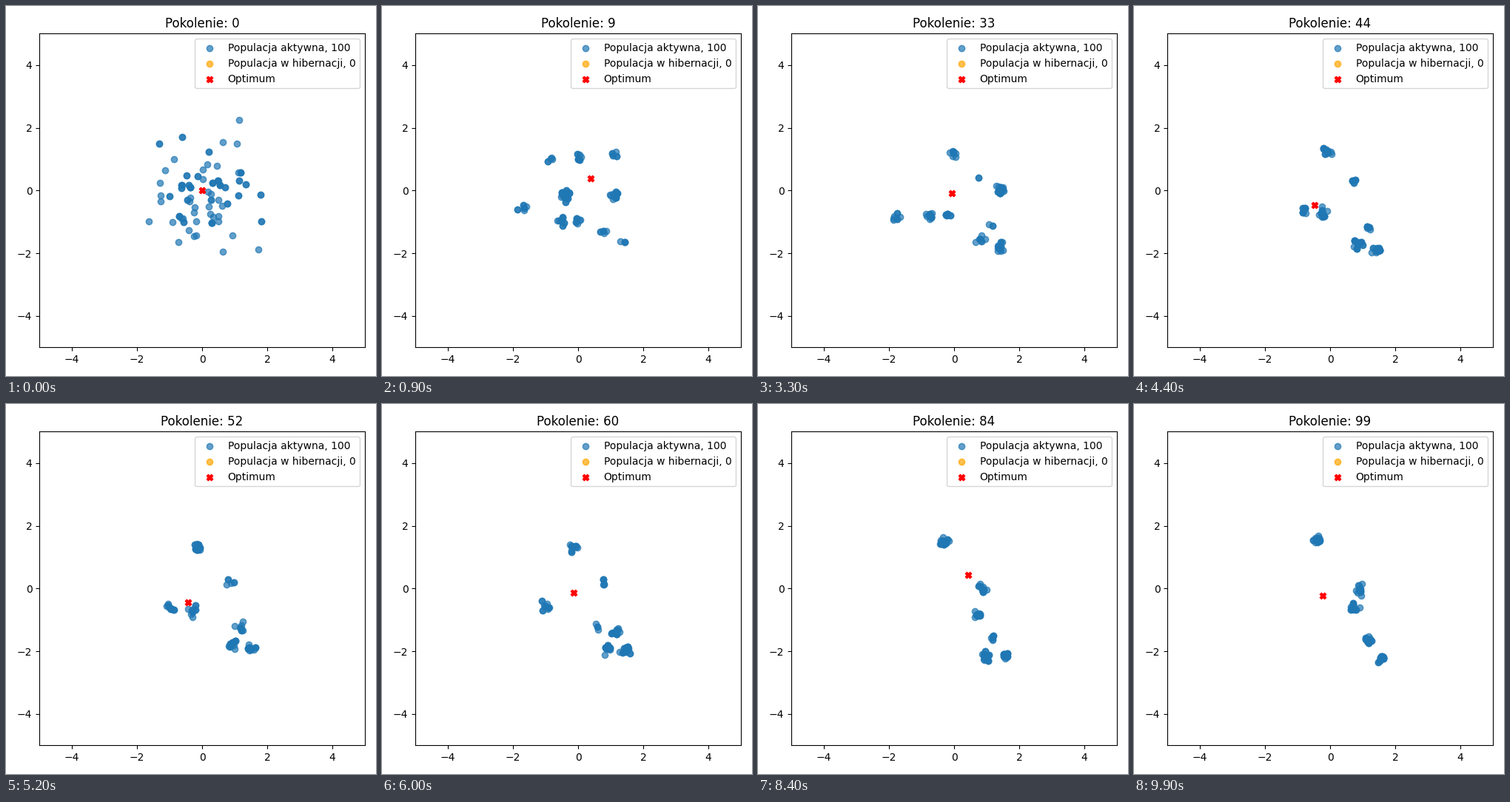
Write a matplotlib script that moves like this. It is 500 px wide and 500 px high and loops after 10000 ms.

```python
import matplotlib.pyplot as plt
import numpy as np
from matplotlib.animation import FuncAnimation

GENERATIONS = 100
POPULATION = 100
SPREAD = 0.075        # scatter of a lineage around its centre
MUTATION_RATE = 0.45  # share of individuals that move each generation
SETTLE_RATE = 0.4     # how fast the first random cloud joins the lineages
MIGRATION_RATE = 0.03

# Lineages drift in a straight line: (born, dies, start point, end point).
LINEAGES = [
    (0, 99, (0.12, 1.05), (-0.38, 1.55)),
    (0, 38, (-1.63, -0.45), (-1.85, -0.90)),
    (0, 80, (-0.45, -1.05), (-1.20, -0.42)),
    (0, 28, (-0.20, -0.05), (-0.80, -0.40)),
    (0, 36, (0.95, -0.20), (1.45, 0.00)),
    (0, 92, (0.78, -1.20), (0.98, -2.25)),
    (0, 99, (1.30, -1.60), (1.60, -2.20)),
    (0, 52, (0.05, -1.05), (-0.30, -0.70)),
    (0, 18, (1.15, 1.20), (1.10, 1.15)),
    (0, 18, (-0.88, 1.08), (-0.82, 1.10)),
    (16, 99, (1.20, -1.00), (1.15, -1.65)),
    (30, 99, (0.75, 0.35), (0.88, -0.05)),
    (48, 99, (0.60, -1.35), (0.72, -0.60)),
]


def centres_at(g):
    """Centres of all lineages and which of them are alive."""
    born, dies, start, end = (np.array(v) for v in zip(*LINEAGES))
    u = np.clip((g - born) / (dies - born), 0, 1)[:, None]
    return start + (end - start) * u, (born <= g) & (g <= dies)


def nearest(points, centres):
    return np.linalg.norm(points[:, None] - centres, axis=2).argmin(axis=1)


def evolve(seed=11):
    """Selected individuals of every generation; repeats overlap and look darker."""
    rng = np.random.default_rng(seed)
    points = rng.normal((0, -0.2), (0.85, 0.95), (POPULATION, 2))
    loose = np.ones(POPULATION, bool)
    lineage = np.zeros(POPULATION, int)
    offset = rng.normal(0, SPREAD, points.shape)
    history = []
    for g in range(GENERATIONS):
        if g:
            centres, alive = centres_at(g)
            living = np.flatnonzero(alive)

            joins = loose & (rng.random(POPULATION) < SETTLE_RATE)
            lineage[joins] = living[nearest(points[joins], centres[living])]
            loose &= ~joins

            moves = ~alive[lineage] | (rng.random(POPULATION) < MIGRATION_RATE)
            lineage[moves] = rng.choice(living, moves.sum())

            mutates = rng.random(POPULATION) < MUTATION_RATE
            offset[mutates] = rng.normal(0, SPREAD, (mutates.sum(), 2))
            points = np.where(loose[:, None], points, centres[lineage] + offset)
        history.append(points[rng.integers(0, POPULATION, POPULATION)])
    return history


history = evolve()

plt.rcParams["font.family"] = "DejaVu Sans"
fig, ax = plt.subplots(figsize=(5, 5), dpi=100)
active = ax.scatter(*history[0].T, alpha=0.7, color="tab:blue",
                    label=f"Populacja aktywna, {POPULATION}")
ax.scatter([], [], alpha=0.7, color="orange", label="Populacja w hibernacji, 0")
optimum = ax.scatter([0], [0], color="red", marker="X", label="Optimum")
ax.set(xlim=(-5, 5), ylim=(-5, 5), xticks=range(-4, 5, 2), yticks=range(-4, 5, 2))
title = ax.set_title("Pokolenie: 0")
ax.legend(loc="upper right")
fig.tight_layout()


def update(g):
    active.set_offsets(history[g])
    target = 0.5 * np.sin(0.1 * g)
    optimum.set_offsets([(target, target)])
    title.set_text(f"Pokolenie: {g}")
    return active, optimum, title


anim = FuncAnimation(fig, update, frames=GENERATIONS, interval=100,
                     repeat=True, repeat_delay=0, blit=False)
plt.show()
```
